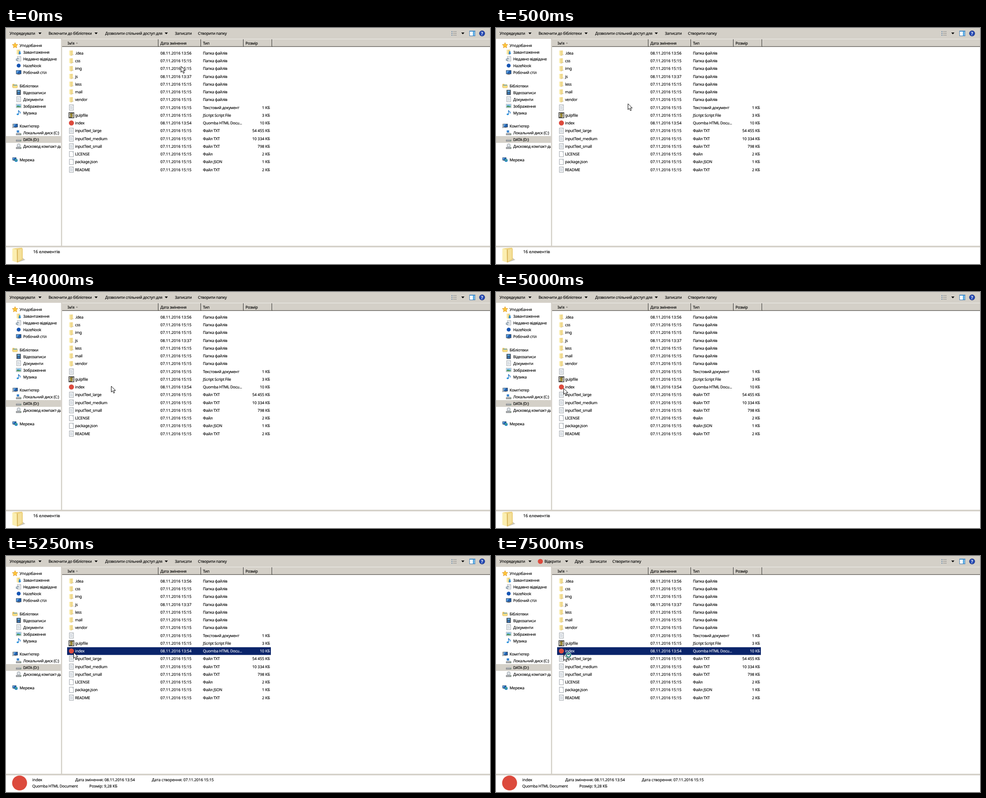
Write an HTML page that moves like this. It is 1069x524 px and loops after 8 s.

```html
<!DOCTYPE html>
<html lang="uk">
<head>
<meta charset="utf-8">
<title>File manager</title>
<style>
html, body { margin: 0; width: 100%; height: 100%; overflow: hidden; background: #fff; }
svg { display: block; }
text { font: 8.6px "Noto Sans", "Open Sans", sans-serif; letter-spacing: -.25px; white-space: pre; text-rendering: geometricPrecision; stroke-width: .14px; }
.num { letter-spacing: .04px; }
.info { letter-spacing: -.06px; }
.big { font-size: 9.3px; letter-spacing: 0; }
</style>
</head>
<body>
<svg id="stage" width="1069" height="524" viewBox="0 0 1069 524"></svg>
<script>
const GREY = '#d4d0c8', NAVY = '#0a246a', BRAND = '#dc4a3d';

const rect = (x, y, w, h, fill, more = '') =>
  `<rect x="${x}" y="${y}" width="${w}" height="${h}" fill="${fill}" ${more}/>`;
const path = (d, fill, more = '') => `<path d="${d}" fill="${fill}" ${more}/>`;
const line = (d, color, w = 1) => path(d, 'none', `stroke="${color}" stroke-width="${w}"`);
const dot = (x, y, r, fill, more = '') => `<circle cx="${x}" cy="${y}" r="${r}" fill="${fill}" ${more}/>`;
const group = (id, body) => `<g id="${id}">${body}</g>`;
const at = (x, y, body, scale = 1) => `<g transform="translate(${x} ${y}) scale(${scale})">${body}</g>`;
// y is the middle of the line
const text = (x, y, s, cls = '', fill = '#000', anchor = 'start') =>
  `<text x="${x}" y="${y + 3.2}" class="${cls}" fill="${fill}" stroke="${fill}" text-anchor="${anchor}">${s}</text>`;
const down = (x, y = 12) => path(`M${x - 3.5} ${y - 2}h7l-3.5 4z`, '#000');

// Icons are drawn around their centre
const page = rect(-4.5, -6, 9, 12, '#fdfdfd', 'stroke="#8d959c" stroke-width=".9"')
  + path('M1.8-6v2.7h2.7z', '#c8ced4');
const lined = page + line('M-3-3H1M-3-1H3M-3 1H3M-3 3H3', '#a5b3bf', .8);
const folder = path('M-1 6L5.2 3.8 3 2.2-1 4z', '#c9c5ba')
  + path('M-4.6-5.2L2.6-5.8 3.2-5V3.6L-1 6z', '#ecd07a')
  + path('M-.6-4.2L2.4-4.8V3L-.6 5z', '#f4e09a')
  + path('M-5-5.2L-1.4-4.4-1 6-5 4.6z', '#fbeeb0') + line('M-1.2-4.3L-1 5.8', '#cfa94e', .5);
const screen = rect(-5.5, -4.5, 11, 8, '#1f5fae', 'stroke="#26384f"')
  + path('M-5-4h6l-5 7h-1z', '#5fa2e2') + rect(-3, 4, 6, 1.4, '#777');
const disk = path('M-6 1.4l2-2h8l2 2z', '#e6e8ea', 'stroke="#999" stroke-width=".6"')
  + rect(-6, 1.4, 12, 3, '#a9adb2', 'stroke="#666" stroke-width=".6"') + rect(3, 2.3, 1.6, 1, '#3fae49');
const icons = {
  folder, page, screen, disk,
  doc: lined,
  script: rect(-5.5, -5.8, 11, 11.6, '#eee9d8', 'stroke="#111" stroke-width="1.2"')
    + path('M-2.5-4.2H3.5L1.5-1 3 2 1 4.5H-3.8L-1.5 1.5-3-1z', '#e2c63e', 'stroke="#222" stroke-width=".9"')
    + line('M-2-2.2H1.5M-1 0H1.5M-1.5 2.3H1', '#222', .8),
  web: dot(0, 0, 5.6, BRAND),
  star: path('M0-6.5l1.9 4.2 4.6.5L3 1.2l1 4.8L0 3.6-4 6l1-4.8-3.5-3 4.6-.5z', '#ffc637', 'stroke="#d88b1c" stroke-width=".8"'),
  cloud: dot(0, 0, 4.6, '#1655b3'),
  film: rect(-5, -5.8, 10, 11.6, '#24323f') + rect(-2.8, -4.5, 5.6, 4, '#5fa8dc')
    + rect(-2.8, .6, 5.6, 4, '#3a77b8')
    + path('M-4-5V5.5M4-5V5.5', 'none', 'stroke="#d0d8de" stroke-width=".9" stroke-dasharray="1 1"'),
  picture: rect(-5.8, -4.3, 11.6, 8.6, '#f4f7f9', 'stroke="#929da6" stroke-width=".8"')
    + rect(-4.6, -3.2, 9.2, 6.4, '#7fc0ea') + path('M-4.6 3.2V1l3-2 3 2 3.2-1v3.2z', '#4a935d'),
  note: line('M-.5 3.5V-5.5Q1-2.5 3-1.8Q4.5 0 3 2', '#2277c5', 1.5)
    + `<ellipse cx="-2.2" cy="3.8" rx="2.6" ry="2" fill="#2c91dc"/>`,
  library: path('M-6-4h4l1 1h6v7H-6z', '#e7bd50') + rect(-4, -2, 8.8, 4, '#6ab5de')
    + path('M-6 0H6L5 5.2H-5z', '#f7df86', 'stroke="#c99b3b" stroke-width=".5"'),
  computer: at(1, -.5, screen, .9) + rect(-6, -4.5, 2.5, 9, '#c5cbd0', 'stroke="#67727b" stroke-width=".6"'),
  system: at(0, 1, disk) + rect(-4.5, -5.5, 5.5, 5, '#3b86d0'),
  drive: at(0, 1.5, disk) + dot(0, -2, 3.8, '#d7dde2', 'stroke="#858e96" stroke-width=".8"') + dot(0, -2, 1, '#fff'),
  network: at(-1.5, -1, screen, .75) + dot(2.5, 2, 3.6, '#2586c9')
    + path('M1 0l2-1 1 2-2 3z', '#62b852'),
  download: folder + path('M1-2h3v4h2L2.5 6-1 2h2z', '#2584d2'),
  recent: at(1, 0, lined, .9)
    + path('M-6 0h6l-2-2M-6 0v4h5', '#9bb0c2', 'stroke="#67798a" stroke-width=".7"')
};
const icon = (name, x, y, scale) => at(x, y, icons[name], scale);

const places = [
  ['star', 39, 'Уподобання', 1], ['download', 54, 'Завантаження'], ['recent', 69, 'Недавно відвідане'],
  ['cloud', 84, 'HazeNook'], ['screen', 99, 'Робочий стіл'],
  ['library', 128.5, 'Бібліотеки', 1], ['film', 143.5, 'Відеозаписи'], ['doc', 158.5, 'Документи'],
  ['picture', 173.5, 'Зображення'], ['note', 188.5, 'Музика'],
  ['computer', 218, "Комп'ютер", 1], ['system', 233, 'Локальний диск (C:)'], ['disk', 248, 'DATA (D:)'],
  ['drive', 263, 'Дисковод компакт-диск'], ['network', 292.5, 'Мережа', 1]
];

const FOLDER = 'Папка файлів', TXT = 'Файл TXT';
const files = [
  ...['.idea', 'css', 'img', 'js', 'less', 'mail', 'vendor'].map(n => ['folder', n, FOLDER, '']),
  ['doc', '', 'Текстовий документ', '1 КБ'],
  ['script', 'gulpfile', 'JScript Script File', '3 КБ'],
  ['web', 'index', 'Quomba HTML Docu...', '10 КБ'],
  ['doc', 'inputText_large', TXT, '54 455 КБ'],
  ['doc', 'inputText_medium', TXT, '10 334 КБ'],
  ['doc', 'inputText_small', TXT, '798 КБ'],
  ['page', 'LICENSE', 'Файл', '2 КБ'],
  ['page', 'package.json', 'Файл JSON', '1 КБ'],
  ['doc', 'README', TXT, '2 КБ']
];
const edited = { '.idea': '08.11.2016 13:56', js: '08.11.2016 13:37', index: '08.11.2016 13:54' };
const rowY = i => 55.7 + 17.25 * i;

function fileRow(i, color) {
  const [kind, name, type, size] = files[i], y = rowY(i);
  return icon(kind, 144.5, y) + text(152.5, y, name, '', color)
    + text(341, y, edited[name] || '07.11.2016 15:15', 'num', color)
    + text(435, y, type, '', color) + text(583, y, size, 'info', color, 'end');
}

function frameParts() {
  const heads = [[136, "Ім'я"], [341, 'Дата змінення'], [435, 'Тип'], [529, 'Розмір']];
  const splits = [336, 430, 524, 587];
  return rect(0, 0, 1069, 524, '#fff') + rect(0, 0, 1069, 24, GREY)
    + rect(121.5, 24, 2.5, 460, GREY) + rect(124, 24, 945, 18, GREY)
    + rect(124, 24, 945, 1, '#f0eeea')
    + rect(124, 40, 945, 1, '#aaa79f') + rect(124, 41, 945, 1, '#605d58')
    + rect(0, 483.5, 1069, 3.5, GREY)
    + splits.map(x => rect(x - 1, 25, 1, 16, '#a5a29a') + rect(x, 25, 1, 17, '#45433f') + rect(x + 1, 25, 1, 15, '#f0eeea')).join('')
    + heads.map(([x, s]) => text(x, 33.7, s)).join('')
    + path('M154 34.5h5l-2.5-2.6z', '#85827b');
}

function toolbarRight() {
  const rows = [8, 12, 16].map(y => rect(984, y - 1, 2, 2, '#6686a8') + rect(988, y - .5, 3, 1, '#777') + rect(992, y - .5, 3, 1, '#777'));
  return rows.join('') + down(1009)
    + rect(1024, 6.5, 12, 11, '#fff', 'stroke="#3878b4"') + rect(1031, 8, 4, 9, '#62afe4') + rect(1024, 6, 12, 2, '#408ac8')
    + dot(1051.5, 12, 6, '#2549b4', 'stroke="#14296d" stroke-width=".8"')
    + `<text x="1051.5" y="15.5" text-anchor="middle" fill="#fff" style="font-weight:700;font-size:10px;letter-spacing:0">?</text>`;
}

const labels = list => list.map(([x, s]) => text(x, 12, s)).join('');
const arrow = path('M.5.6V13.7L3.5 10.9 5.7 16 8 15 5.8 10.2H10z', '#fff', 'stroke="#000" stroke-width="1"');
const ring = dot(11, 1.5, 4.6, 'none', 'stroke="#d9f0ee" stroke-width="4"')
  + dot(11, 1.5, 4.6, 'none', 'stroke="#16756f" stroke-width="2.2"')
  + line('M7.2 1.5A3.8 3.8 0 0 1 11-2.3', '#63bdb5', 1);

const stage = document.getElementById('stage');
stage.innerHTML = `<clipPath id="side"><path d="M0 24H121V484H0z"/></clipPath>`
  + frameParts() + rect(0, 240, 121.5, 15, GREY)
  + `<g clip-path="url(#side)">` + places.map(([kind, y, s, top]) =>
      icon(kind, top ? 20 : 28, y - .5, .95) + text(top ? 30 : 38, y, s)).join('') + '</g>'
  + files.map((f, i) => fileRow(i, '#000')).join('')
  + text(8, 12, 'Упорядкувати') + down(75) + toolbarRight()
  + group('folderBar', labels([[94, 'Включити до бібліотеки'], [219, 'Дозволити спільний доступ для'],
      [373, 'Записати'], [424, 'Створити папку']]) + down(199) + down(354))
  + group('fileBar', icon('web', 98, 12) + labels([[107, 'Відкрити'], [174, 'Друк'],
      [207, 'Записати'], [257, 'Створити папку']]) + down(156))
  + group('count', icon('folder', 28, 504, 2.8) + text(60, 496.5, '16 елементів', 'big'))
  + group('details', rect(135, 202.5, 450, 17.2, NAVY) + fileRow(9, '#fff')
      + dot(30, 504, 16.5, BRAND) + text(58, 496.5, 'index', 'info')
      + text(58, 510.7, 'Quomba HTML Document') + text(153, 496.5, 'Дата змінення: 08.11.2016 13:54', 'info')
      + text(322, 496.5, 'Дата створення: 07.11.2016 15:15', 'info') + text(184, 510.7, 'Розмір: 9,28 КБ', 'info'))
  + group('cursor', arrow + group('busy', ring));

// start time, x, y of the pointer tip
const stops = [[0, 386, 84.5], [250, 291, 167.5], [4000, 232, 208.5], [4250, 188, 221],
  [4500, 139, 210], [5000, 149, 213.5], [5500, 149, 218.5]];
const part = id => document.getElementById(id);
const show = (id, on) => part(id).setAttribute('visibility', on ? 'visible' : 'hidden');

function draw() {
  const t = performance.now() % 8000;
  const [, x, y] = stops.filter(s => s[0] <= t).pop();
  const selected = t >= 5250, opening = t >= 5500;
  part('cursor').setAttribute('transform', `translate(${x} ${y})`);
  show('details', selected);
  show('count', !selected);
  show('fileBar', opening);
  show('folderBar', !opening);
  show('busy', opening);
  requestAnimationFrame(draw);
}
draw();
</script>
</body>
</html>
```
